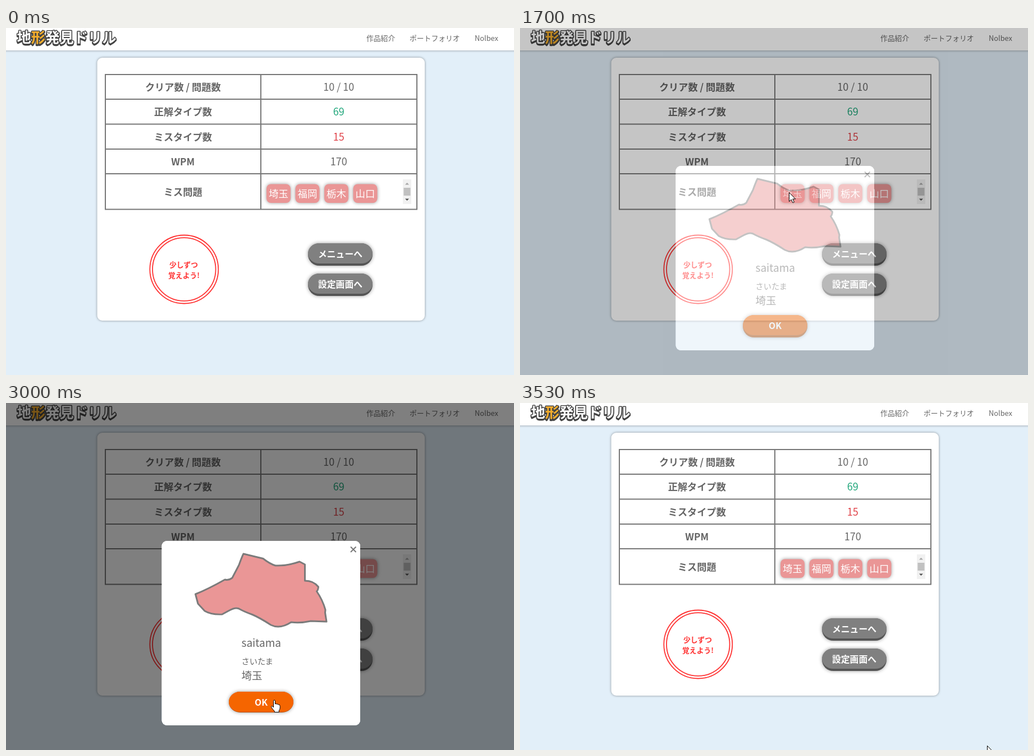
These frames come from a looping animation (905x619 px, 3550 ms). An HTML page:

```html
<!DOCTYPE html>
<html lang="ja">
<head>
<meta charset="utf-8">
<title>地形発見ドリル</title>
<style>
  html, body { margin: 0; width: 100%; height: 100%; overflow: hidden; background: #e2eff9; }
  svg { display: block; width: 100vw; height: 100vh; font-family: "Noto Sans CJK JP", "Noto Sans CJK", "Noto Sans", sans-serif; fill: #666; }
  .bold { font-weight: 700; }
  .mid { text-anchor: middle; }
  .bar { fill: #fff; filter: drop-shadow(0 0 2px rgba(0,0,0,.4)); }
  .glow { filter: drop-shadow(0 0 3px rgba(0,0,0,.4)); }
  .logo { font-size: 25.3px; font-weight: 700; stroke-linejoin: round; }
</style>
</head>
<body>
<svg id="stage" viewBox="0 0 905 619" preserveAspectRatio="none">
  <rect width="905" height="619" fill="#e2eff9"/>
  <rect class="bar" x="-9" y="-9" width="923" height="49"/>
  <g class="logo">
    <text x="19.5" y="28" fill="#444" stroke="#444" stroke-width="3">地形発見ドリル</text>
    <text x="19.5" y="25.5" fill="#fff" stroke="#444" stroke-width="3" paint-order="stroke">地<tspan fill="#f5ae2c">形</tspan>発見ドリル</text>
  </g>
  <g font-size="12.8">
    <text x="642" y="23">作品紹介</text>
    <text x="719" y="23">ポートフォリオ</text>
    <text x="835" y="23">Nolbex</text>
  </g>

  <rect class="bar" x="162.5" y="53" width="583.5" height="469" rx="9"/>
  <path d="M177 83H732V323.5H177ZM454 83V323.5M177 127H732M177 171.5H732M177 216H732M177 260H732" fill="none" stroke="#777" stroke-width="2"/>
  <g id="table" class="mid"></g>
  <g id="chips" class="mid"></g>
  <rect x="707" y="270" width="15" height="44" fill="#f1f1f1"/>
  <rect x="708.5" y="285" width="12" height="14" fill="#c1c1c1"/>
  <path d="M711 279.5l3.5-3.5 3.5 3.5z" fill="#a3a3a3"/>
  <path d="M711 304.500h7l-3.500 3.500z" fill="#505050"/>

  <g fill="none" stroke="#f33" stroke-width="1.800">
    <circle cx="317.300" cy="430.500" r="61"/>
    <circle cx="317.300" cy="430.500" r="56.300"/>
  </g>
  <g class="mid bold" font-size="12.800" fill="#f33">
    <text x="316.500" y="427">少しずつ</text>
    <text x="317" y="445.500">覚えよう!</text>
  </g>
  <g id="buttons"></g>

  <g id="modal">
    <path fill-rule="evenodd" fill="#000" fill-opacity=".5" d="M0 0H905V619H0ZM286.500 246H622a9 9 0 0 1 9 9V566a9 9 0 0 1-9 9H286.500a9 9 0 0 1-9-9V255a9 9 0 0 1 9-9Z"/>
    <rect x="277.500" y="246" width="353.500" height="329" rx="9" fill="#fff"/>
    <path d="M614 256.500l9.500 9.500m0-9.500l-9.500 9.500" stroke="#777" stroke-width="2"/>
    <path fill="#ea9696" stroke="#7b7b7b" stroke-width="3" stroke-linejoin="round" d="M423 269L458 277.500Q470 287 480 290Q500 291 523 283L532.500 288V317Q548 317 556.500 328Q556 334 553.500 336Q564 351 569 369L568.500 374 571 390L543 389Q525 393 508 391Q488 404 472 396Q452 383 439 377.500Q424 372 417 368Q410 363 396 371L385 377Q366 378 354 371L342 358 337.500 341Q360 332 390 315Q396 317 403 312L415 289Q420 275 423 269Z"/>
    <text x="419.500" y="434.500" font-size="19">saitama</text>
    <text x="419.500" y="466" font-size="14.200">さいたま</text>
    <text x="419.500" y="493" font-size="18.500">埼玉</text>
    <g id="ok"></g>
  </g>

  <g id="cursor" stroke="#000" fill="#fff" stroke-linejoin="round">
    <path id="arrow" d="M.5.500V16.500L4.200 13 7 18.800 9.500 17.600 6.800 12H11.700Z"/>
    <path id="hand" d="M-1.500 11V1.500Q-1.500 0 0 0T1.500 1.500V7Q3 5.500 4.500 7.300Q6 6.200 7.300 8Q10.200 7.600 10.200 10.500V14Q10 17 8.300 18.500V21.500H.2V19.500Q-3 16.500-5.300 12.700Q-5.800 10.800-4.200 10.600Q-2.800 11-1.500 13Z"/>
  </g>
</svg>
<script>
const LOOP = 3550;
const $ = id => document.getElementById(id);
const clamp = v => Math.min(1, Math.max(0, v));
const mix = (a, b, p) => a + (b - a) * p;
const smooth = p => p * p * (3 - 2 * p);
const label = (x, y, size, text, attrs = "") =>
  `<text x="${x}" y="${y}" font-size="${size}" ${attrs}>${text}</text>`;

// Pill whose lower edge shrinks and whose face sinks when hovered.
function pill(x, y, text, face, edge, press = 0) {
  const top = y + 3 * press, h = 40 - 3 * press, lip = 4 - 3 * press;
  return `<g class="glow"><rect x="${x}" y="${top}" width="115" height="${h}" rx="20" fill="${edge}"/>
    <rect x="${x}" y="${top}" width="115" height="${h - lip}" rx="20" ry="18" fill="${face}"/></g>` +
    label(x + 57.5, top + 24.8, 15.8, text, 'class="mid bold" fill="#fff"');
}

const rows = [
  ["クリア数 / 問題数", "10 / 10", 112],
  ["正解タイプ数", "69", 156, "#1fa67a"],
  ["ミスタイプ数", "15", 200.5, "#e0444a"],
  ["WPM", "170", 245],
  ["ミス問題", "", 299]
];
$("table").innerHTML = rows.map(([name, value, y, color = "#666"]) =>
  label(315.300, y, 17.200, name, 'class="bold"') + label(592.700, y, 18, value, `fill="${color}"`)).join("");

$("chips").innerHTML = ["埼玉", "福岡", "栃木", "山口"].map((name, i) => {
  const x = 464 + 51.500 * i;
  return `<rect class="glow" x="${x}" y="278.500" width="43" height="33.500" rx="8" fill="#ea9696"/>` +
    label(x + 21.500, 302.300, 17.400, name, 'fill="#fff" font-weight="500"');
}).join("");

$("buttons").innerHTML = pill(538, 384, "メニューへ", "#808080", "#555") +
  pill(538, 438, "設定画面へ", "#808080", "#555");

// CSS "ease": cubic-bezier(.25, .1, .25, 1)
function ease(p) {
  if (p <= 0 || p >= 1) return clamp(p);
  const curve = (a, b, s) => 3 * a * s * (1 - s) ** 2 + 3 * b * s * s * (1 - s) + s ** 3;
  let lo = 0, hi = 1;
  for (let i = 0; i < 20; i++) {
    const m = (lo + hi) / 2;
    if (curve(.25, .25, m) < p) lo = m; else hi = m;
  }
  return curve(.1, 1, lo);
}

// Pointer moves: start, end, target x, target y
const start = [843, 577];
const moves = [
  [390, 880, 519, 308], [880, 910, 515, 306], [930, 1130, 479, 293],
  [1780, 2070, 483, 353], [2085, 2570, 478, 530],
  [3230, 3480, 806, 608], [3500, 3530, 832, 611]
];
function pointer(t) {
  let [x, y] = start;
  for (const [a, b, tx, ty] of moves) {
    const p = smooth(clamp((t - a) / (b - a)));
    x = mix(x, tx, p);
    y = mix(y, ty, p);
  }
  return [x, y];
}

function draw(t) {
  const [x, y] = pointer(t);
  const open = ease((t - 1620) / 300) - ease((t - 3094) / 300);
  $("modal").setAttribute("opacity", open.toFixed(4));

  const overOk = t > 2085 && t < 3260 && y > 512;
  const press = overOk ? 1 : 0;
  $("ok").innerHTML = pill(397, 512, "OK", press ? "#f56500" : "#eb6100", "#b84c00", press);

  const overChip = t < 1630 && y < 312;
  const hand = overOk || overChip;
  $("cursor").setAttribute("visibility", t < 390 ? "hidden" : "inherit");
  $("cursor").setAttribute("transform", `translate(${x.toFixed(1)} ${y.toFixed(1)})`);
  $("hand").setAttribute("display", hand ? "inline" : "none");
  $("arrow").setAttribute("display", hand ? "none" : "inline");
}

const origin = performance.now();
function tick() {
  draw((performance.now() - origin) % LOOP);
  requestAnimationFrame(tick);
}
draw(0);
tick();
</script>
</body>
</html>
```
